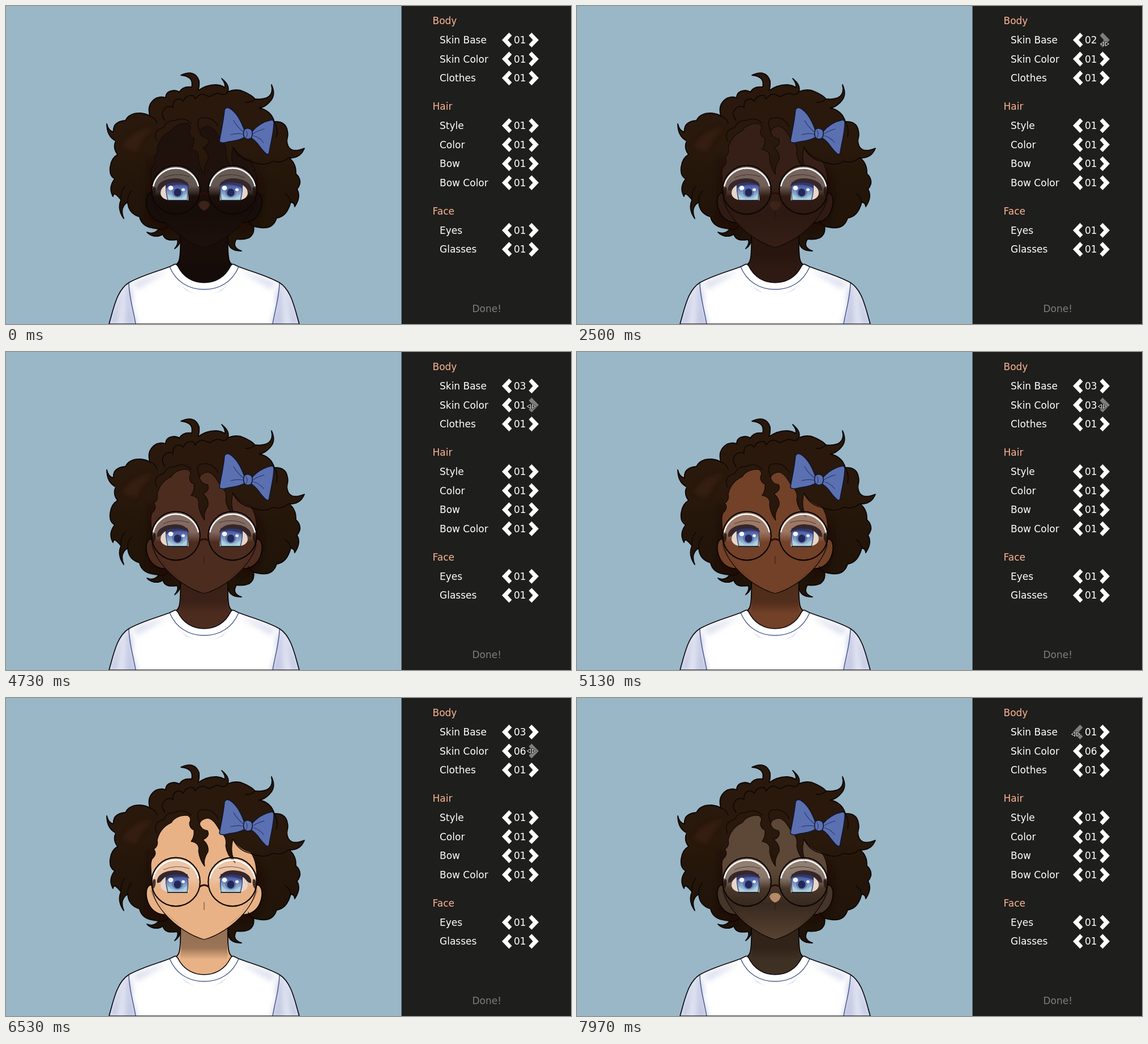
Animation of 998x561 px, one loop 8 s. Source, as an HTML page:

```html
<!DOCTYPE html>
<html lang="en">
<head>
<meta charset="utf-8">
<title>Character creator</title>
<style>
html, body { margin: 0; width: 100%; height: 100%; overflow: hidden; background: #9ab7c7; }
svg { display: block; width: 100vw; height: 100vh; }
text { font: 17px "DejaVu Sans", sans-serif; fill: #fff; }
.head { fill: #fab491; }
.ink { stroke: #0b0604; stroke-width: 1.8; stroke-linejoin: round; }
.skin { stroke: #140a06; stroke-width: 1.2; }
.line { fill: none; stroke: #0b0604; stroke-width: 1.5; stroke-linecap: round; }
.hair { fill: url(#hair); }
.seam { fill: none; stroke: #46548c; stroke-width: 1.4; }
.bow { fill: #5b70b1; stroke: #11172e; stroke-width: 1.6; stroke-linejoin: round; }
.fold { fill: none; stroke: #2b3a70; stroke-width: 1.2; stroke-linecap: round; }
</style>
</head>
<body>
<svg viewBox="0 0 998 561" preserveAspectRatio="none">
<defs>
  <linearGradient id="hair" gradientUnits="userSpaceOnUse" x1="0" y1="135" x2="0" y2="420">
    <stop offset="0" stop-color="#29180b"/><stop offset=".42" stop-color="#29180c"/>
    <stop offset=".65" stop-color="#231509"/><stop offset="1" stop-color="#201308"/>
  </linearGradient>
  <linearGradient id="lens" x1="0" y1="0" x2="0" y2="1">
    <stop offset="0" stop-color="#f4eae4" stop-opacity=".35"/><stop offset=".42" stop-color="#f4eae4" stop-opacity=".32"/>
    <stop offset=".64" stop-color="#f4eae4" stop-opacity="0"/>
  </linearGradient>
  <linearGradient id="iris" x1="0" y1="0" x2="0" y2="1">
    <stop offset="0" stop-color="#383f78"/><stop offset=".3" stop-color="#5a6cb2"/>
    <stop offset=".55" stop-color="#7f9dca"/><stop offset="1" stop-color="#a9ccd6"/>
  </linearGradient>
  <linearGradient id="neckShade" gradientUnits="userSpaceOnUse" x1="0" y1="400" x2="0" y2="468">
    <stop offset="0" stop-color="#1d0f08" stop-opacity=".42"/><stop offset=".6" stop-color="#1d0f08" stop-opacity=".38"/>
    <stop offset=".9" stop-color="#1d0f08" stop-opacity="0"/>
  </linearGradient>
  <linearGradient id="furShade" gradientUnits="userSpaceOnUse" x1="0" y1="300" x2="0" y2="426">
    <stop offset="0" stop-color="#0c0502" stop-opacity="0"/><stop offset=".5" stop-color="#0c0502" stop-opacity=".45"/>
    <stop offset="1" stop-color="#0c0502" stop-opacity=".06"/>
  </linearGradient>
  <filter id="soft" x="-30%" y="-30%" width="160%" height="160%"><feGaussianBlur stdDeviation="5"/></filter>
  <clipPath id="shirtClip"><use href="#shirt"/></clipPath>
  <path id="shirt" d="M182 561C190 533 196 501 217 488C240 475 268 468 289 460L297 456Q300 454 303 458C313 479 331 488 350 488C369 488 387 479 397 458Q400 454 403 456L411 460C432 468 460 475 483 488C504 501 510 533 518 561Z"/>
  <path id="face" d="M257 325C257 302 254 292 258 284Q268 275 261 267Q270 260 267 251Q272 229 292 220Q300 207 320 207Q329 211 324 220Q324 230 332 233Q333 245 327 253Q343 256 340 270Q342 286 351 297Q348 285 357 271Q359 260 348 250Q361 244 356 234Q344 232 342 222Q344 214 356 212C372 215 375 235 385 243Q390 249 388 261Q390 278 405 291Q395 272 401 249Q414 268 432 272C442 286 443 302 443 325C443 346 433 365 420 380C402 402 371 421 350 426C329 421 298 402 280 380C267 365 257 346 257 325Z"/>

  <g id="eye">
    <path d="M273 331C273 320 281 315 290 314L291 343L285 342C278 340 274 337 273 331Z" fill="#e6d6cb"/>
    <path d="M312 312Q324 320 322 343L309 343Z" fill="#f1e8e4"/>
    <path d="M283 311H320Q323 328 320 343H286Q281 327 283 311Z" fill="url(#iris)" stroke="#2b3258" stroke-width="1.100"/>
    <path d="M283 311H321V317Q302 312 283 321Z" fill="#2c3060" opacity=".75"/>
    <circle cx="303" cy="328" r="10" fill="#5468aa" opacity=".7"/>
    <ellipse cx="303" cy="329" rx="6.500" ry="7" fill="#222855"/>
    <path d="M286 332L297 341L310 340L319 331V342H287Z" fill="#b4d8de" opacity=".8"/>
    <path d="M285 343H321" stroke="#161a2a" stroke-width="1.500"/>
    <path d="M267 326C265 313 279 304 301 304Q319 305 324 319Q315 311 301 311Q284 311 276 321Q272 327 267 326Z" fill="#35262a"/>
    <path d="M278 303Q300 293 324 301" fill="none" stroke="#2b1a19" stroke-width="1" opacity=".65"/>
    <path d="M257 330Q259 317 264 320Q266 331 260 337Z" fill="#20130d" opacity=".8"/>
  </g>
  <g id="frame">
    <path d="M260 318A41 41 0 0 1 340 318" fill="none" stroke="#fff" stroke-width="2.300"/>
    <circle cx="300" cy="324.500" r="42.800" fill="none" stroke="#0d0706" stroke-width="2.200"/>
  </g>
  <g id="ear">
    <path class="ink" d="M258 330C246 328 246 349 251 361C257 376 270 384 286 382L276 335Z"/>
    <path d="M256 339Q261 355 271 368" fill="none" stroke="#160a06" stroke-width="1.200" opacity=".3"/>
  </g>
  <path id="arrow" d="M-8.500 0L4 -13L9 -8L1.800 0L9 8L4 13Z"/>
  <path id="tips" d="M-7.500 0L-1.500 -3.600V3.600ZM7.500 0L1.500 -3.600V3.600Z"/>
</defs>

<rect width="998" height="561" fill="#9ab7c7"/>

<g class="ink hair">
  <path d="M194 238Q178 230 178 208Q181 221 190 222Q188 204 211 202Q218 188 238 189Q248 190 254 194Q248 172 266 162Q276 159 282 162Q282 150 297 149Q305 150 306 152Q312 141 328 143Q332 124 309 122Q334 111 341 132Q342 146 338 150"/>
  <path d="M338 150Q355 138 372 139Q382 140 386 144Q389 138 381 128Q396 140 392 151Q408 145 420 151Q434 157 440 164Q475 167 469 139Q478 158 465 170Q455 180 447 180Q468 184 474 204Q494 203 497 220Q499 228 496 236"/>
  <path d="M496 236Q497 263 527 251Q520 269 500 268Q513 278 512 296Q521 304 519 314Q517 320 514 323Q522 336 510 354Q510 347 503 346Q496 372 478 374Q472 394 450 391Q440 390 437 388Q440 402 429 409Q420 413 407 411Q398 426 416 432Q394 433 392 415"/>
  <path d="M308 405Q310 420 298 428Q306 418 302 412Q280 416 277 402Q272 407 262 406Q253 404 249 399Q262 404 270 393Q240 392 236 372Q216 366 215 346Q200 355 208 375Q196 358 203 342Q190 325 189 336Q180 320 192 305Q182 300 184 284Q186 268 197 262Q188 250 194 238"/>
</g>
<path d="M194 238L338 150L496 236L392 415L308 405Z" fill="url(#hair)" stroke="url(#hair)" stroke-width="3"/>
<g filter="url(#soft)">
  <path d="M205 248Q226 215 262 215Q240 230 230 258Z" fill="#4a2617" opacity=".4"/>
  <path d="M250 265Q252 330 245 380L290 404L280 300ZM440 280Q470 320 440 390L410 400Z" fill="#150b05" opacity=".35"/>
</g>

<path class="ink neck" d="M308 398Q309 436 306 448Q304 456 296 458L330 490H370L404 458Q396 456 394 448Q391 436 392 398Z"/>
<path d="M309 400H391V448Q398 470 350 470Q302 470 309 448Z" fill="url(#neckShade)"/>

<use href="#shirt" fill="#fff"/>
<g clip-path="url(#shirtClip)">
  <g id="sleeve">
    <path d="M180 565L200 500L217 488L230 565Z" fill="#e2e5f2"/>
    <path d="M214 490Q228 505 222 527L233 565H210ZM182 561L205 498L196 561Z" fill="#b5bbdc" opacity=".65" filter="url(#soft)"/>
    <path d="M222 488Q250 476 286 468L232 500Z" fill="#c5cae5" opacity=".55" filter="url(#soft)"/>
    <path d="M303 486Q315 500 334 508L318 502Z" fill="#c5cae5" opacity=".6"/>
    <path class="seam" d="M217 488C217 513 225 536 229 561"/>
  </g>
  <use href="#sleeve" transform="matrix(-1 0 0 1 700 0)"/>
</g>
<path class="seam" d="M289 460C300 486 322 500 350 500C378 500 400 486 411 460"/>
<use href="#shirt" fill="none" stroke="#0b0a12" stroke-width="1.700"/>

<g class="ears"><use href="#ear"/><use href="#ear" transform="matrix(-1 0 0 1 700 0)"/></g>
<use href="#face" class="skin"/>
<path d="M271 359Q281 382 308 400Q286 388 271 359ZM429 359Q419 382 392 400Q414 388 429 359Z" fill="#1c0e08" opacity=".4"/>
<use href="#face" class="fur" fill="url(#furShade)"/>
<path d="M350 360V374" stroke="#1f0f09" stroke-width="1.200" opacity=".6"/>
<path class="nose" d="M340 350Q343 343 350 344Q357 343 360 350Q358 358 350 361Q342 358 340 350Z"/>

<g class="line">
  <path d="M281 202Q270 188 284 178Q291 176 295 179Q294 163 308 164L313 168Q318 156 331 158L334 164Q344 151 354 158L360 160Q373 151 382 156Q390 157 392 150"/>
  <path d="M266 238Q258 220 279 214Q284 201 299 202Q314 194 327 207M342 220Q332 197 350 197Q366 196 375 213" opacity=".7"/>
  <path d="M440 164Q433 171 423 170M474 205Q481 215 478 231M401 249Q411 270 432 274Q458 284 470 274Q489 278 498 268"/>
  <path d="M203 342Q202 327 210 318M215 346Q214 334 222 326M503 346Q501 336 493 331M270 393Q280 397 286 388M437 388Q430 385 428 378M254 194Q264 197 267 207" opacity=".8"/>
</g>

<circle cx="300" cy="324" r="42" fill="url(#lens)"/>
<circle cx="400" cy="324" r="42" fill="url(#lens)"/>
<use href="#eye"/><use href="#eye" transform="matrix(-1 0 0 1 700 0)"/>
<g fill="#f4f8ff">
  <g id="glints"><ellipse cx="291" cy="321" rx="4.500" ry="4"/><ellipse cx="313" cy="324" rx="3" ry="2.500"/></g>
  <use href="#glints" x="95"/>
</g>
<use href="#frame"/><use href="#frame" x="100"/>
<path d="M342 333Q350 327 358 333" fill="none" stroke="#2a0e09" stroke-width="3"/>

<g class="bow">
  <path d="M421 219C416 205 409 189 396 181Q389 177 386 183C384 205 380 220 377 238Q378 242 386 241C396 238 408 239 421 232Z"/>
  <path d="M434 222C445 209 459 203 469 201Q474 201 473 209C472 228 467 243 465 258Q464 264 459 260C449 252 444 238 433 233Z"/>
  <path d="M421 218Q427 213 434 219Q437 226 433 233Q427 237 421 232Q418 225 421 218Z"/>
</g>
<path class="fold" d="M419 222Q408 213 402 202M418 226Q408 224 397 227M437 225Q447 219 456 217M437 229Q447 231 455 241M424 220Q428 226 424 232"/>

<rect x="698.600" width="300" height="561" fill="#1e1e1d"/>
<g id="panel"></g>
<text x="823.500" y="540" style="fill:#7d7d7c">Done!</text>
<g id="cursor" fill="none" stroke-linejoin="round">
  <use href="#tips" stroke="#111" stroke-width="2.400"/>
  <use href="#tips" stroke="#fff"/>
</g>
</svg>
<script>
const LOOP = 8000, ROW = 33.58;
const $ = s => document.querySelector(s);

const sections = [
  ['Body', ['Skin Base', 'Skin Color', 'Clothes']],
  ['Hair', ['Style', 'Color', 'Bow', 'Bow Color']],
  ['Face', ['Eyes', 'Glasses']]
];

let markup = '', y = 26.35;
const label = (x, text, cls = '') => `<text class="${cls}" x="${x}" y="${Math.round(y + 6)}">${text}</text>`;
const arrow = (x, flip) => `<use class="arrow" href="#arrow" data-x="${x}" data-y="${y}"
  transform="translate(${x} ${y}) scale(${flip} 1)"/>`;
for (const [title, items] of sections) {
  markup += label(753.5, title, 'head');
  for (const item of items) {
    y += ROW;
    markup += label(766, item) + label(897, '01', 'value') + arrow(884.5, 1) + arrow(932.5, -1);
  }
  y += ROW * 1.5;
}
$('#panel').innerHTML = markup;
const arrows = [...document.querySelectorAll('.arrow')];
const [baseText, colorText] = document.querySelectorAll('.value');

// [time, value]
const baseSteps = [[0, 1], [2500, 2], [3130, 3], [3630, 1], [4230, 2], [4400, 3], [7300, 2], [7700, 1]];
const colorSteps = [[0, 1], [4970, 2], [5130, 3], [5300, 4], [5500, 5], [5670, 6]];
// [time, x, y]
const cursorPath = [
  [100, 63, 5], [300, 310, 34], [520, 650, 72], [700, 850, 96], [800, 906, 98], [900, 925, 68],
  [1270, 932, 67], [4430, 932, 67], [4730, 928, 96], [6500, 928, 96], [6530, 928, 93.5],
  [6930, 893, 77], [7070, 884, 68], [7400, 879, 63], [7960, 879, 63], [7970, 881, 64]
];

const skins = [[77, 44, 32], [94, 53, 35], [114, 65, 40], [136, 77, 44], [156, 91, 49], [232, 178, 134]];
const shades = [
  { face: .4, ear: .3, neck: .27, fur: 1 },
  { face: .7, ear: .62, neck: .6, fur: .5 },
  { face: 1, ear: 1, neck: 1, fur: 0 }
];
const tint = (rgb, k) => `rgb(${rgb.map(v => Math.round(v * k))})`;
const valueAt = (steps, t) => steps.filter(s => s[0] <= t).pop()[1];

function cursorAt(t) {
  const i = cursorPath.findIndex(p => p[0] > t);
  if (i < 0) return cursorPath[cursorPath.length - 1].slice(1);
  if (i === 0) return [-50, -50];
  const [t0, x0, y0] = cursorPath[i - 1], [t1, x1, y1] = cursorPath[i];
  const k = (t - t0) / (t1 - t0);
  return [x0 + (x1 - x0) * k, y0 + (y1 - y0) * k];
}

function render(t) {
  const base = valueAt(baseSteps, t), color = valueAt(colorSteps, t);
  const skin = skins[color - 1], shade = shades[base - 1];
  baseText.textContent = '0' + base;
  colorText.textContent = '0' + color;
  $('.skin').style.fill = tint(skin, shade.face);
  $('.ears').style.fill = tint(skin, shade.ear);
  $('.neck').style.fill = tint(skin, shade.neck);
  $('.fur').style.opacity = shade.fur;
  $('.nose').style.fill = tint(skin, .78);
  $('.nose').style.opacity = base === 3 ? 0 : 1;

  const [x, y] = cursorAt(t);
  $('#cursor').setAttribute('transform', `translate(${x} ${y})`);
  for (const a of arrows) {
    const over = Math.abs(x - a.dataset.x) < 9 && Math.abs(y - a.dataset.y) < 13;
    a.style.fill = over ? '#7e7e7d' : '#fff';
  }
}

const start = performance.now();
function tick() {
  render((performance.now() - start) % LOOP);
  requestAnimationFrame(tick);
}
render(0);
requestAnimationFrame(tick);
</script>
</body>
</html>
```
